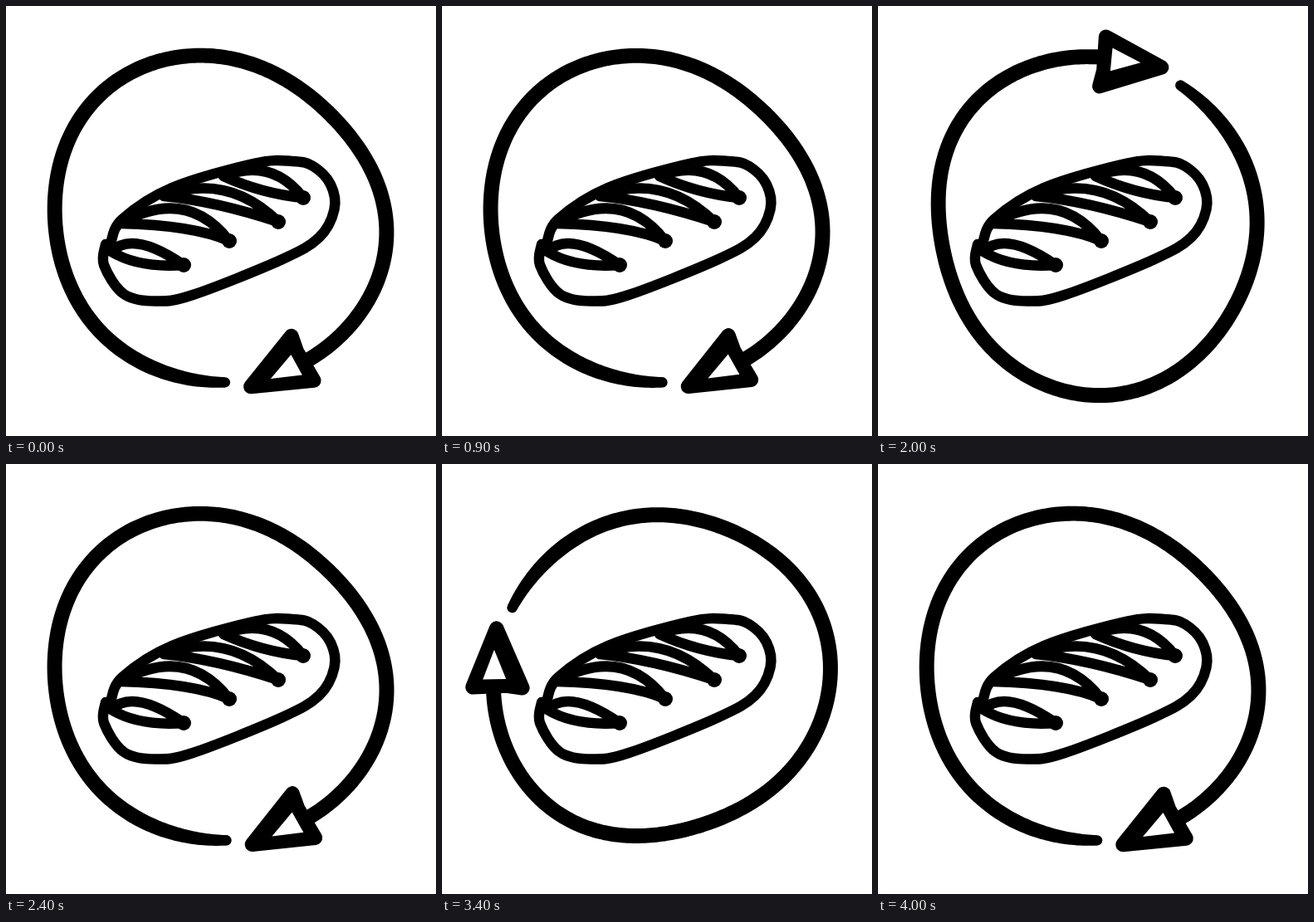
Recreate the animation shown at these times as an HTML page with a canvas. Size 518x518 px, loop 4400 ms.

```html
<!DOCTYPE html>
<html lang="en">
<head>
<meta charset="utf-8">
<title>Bread loop</title>
<style>
  html, body { margin: 0; width: 100%; height: 100%; overflow: hidden; background: #fff; }
  canvas { display: block; width: 518px; height: 518px; }
</style>
</head>
<body>
<canvas id="stage" width="518" height="518"></canvas>
<script>
const ctx = document.getElementById('stage').getContext('2d');
const SIZE = 518, MID = 259, FULL = Math.PI * 2;
const LOOP = 4400, STEP = 100, TURN = 1500, SPIN = 1000, LEAD = 34;

// The ring runs clockwise from its tail to the arrow's neck, in degrees
const TAIL = 88.5, NECK = 418;

const LOAF = [[120, 287], [118, 312], [142, 347], [180, 355.5], [225, 348], [332, 305.5],
  [377, 279], [395.5, 245], [391, 215], [370, 193], [345, 187], [300, 189.5],
  [200, 219], [140, 257], [126, 286]];

// Each cut is a leaf: left tip, right tip, and the control points of its two edges
const CUTS = [
  { left: [127, 296], right: [214, 312], over: [153, 270], under: [160, 316] },
  { left: [138, 262], right: [269, 283], over: [217, 217], under: [226, 264] },
  { left: [190, 229], right: [328, 260], over: [266, 200], under: [252, 235] },
  { left: [262, 205], right: [358, 231], over: [320, 182], under: [308, 226] }
];

const cosDeg = deg => Math.cos(deg * Math.PI / 180);
const sinDeg = deg => Math.sin(deg * Math.PI / 180);
const polar = (deg, r) => [MID + r * cosDeg(deg), MID + r * sinDeg(deg)];
const ease = p => p < 0.5 ? 4 * p ** 3 : 1 - 4 * (1 - p) ** 3;

// A slightly lopsided hand-drawn circle
function radius(deg) {
  return 197.7 - 4.7 * cosDeg(deg - 7) + 7.45 * cosDeg(2 * deg - 77)
    + 3.6 * cosDeg(3 * deg - 18) + 0.7 * cosDeg(5 * deg);
}

// The pen thickens quickly after the tail
function halfWidth(deg) {
  const k = Math.min(1, (deg - TAIL) / 36);
  return 6.2 + 2.8 * k * (2 - k);
}

function poly(pts) {
  ctx.beginPath();
  pts.forEach(p => ctx.lineTo(...p));
  ctx.closePath();
}

function dot([x, y], r) {
  ctx.beginPath();
  ctx.arc(x, y, r, 0, FULL);
  ctx.fill();
}

// Smooth stroke through all points
function curve(pts) {
  const at = i => pts[Math.max(0, Math.min(pts.length - 1, i))];
  ctx.beginPath();
  ctx.moveTo(...pts[0]);
  for (let i = 0; i < pts.length - 1; i++) {
    const [a, b, c, d] = [i - 1, i, i + 1, i + 2].map(at);
    ctx.bezierCurveTo(b[0] + (c[0] - a[0]) / 6, b[1] + (c[1] - a[1]) / 6,
      c[0] - (d[0] - b[0]) / 6, c[1] - (d[1] - b[1]) / 6, ...c);
  }
  ctx.stroke();
}

function drawRing() {
  const outer = [], inner = [];
  for (let a = TAIL; a <= NECK; a++) {
    const r = radius(a), h = halfWidth(a);
    outer.push(polar(a, r + h));
    inner.unshift(polar(a, r - h));
  }
  poly(outer.concat(inner));
  ctx.fill();
  dot(polar(TAIL, radius(TAIL)), halfWidth(TAIL));
}

function drawHead() {
  ctx.lineWidth = 17.5;
  poly([[344, 397.5], [295, 458.5], [371, 451], [350.5, 416]]);
  ctx.fill();
  ctx.stroke();
  ctx.fillStyle = '#fff';
  poly([[343.5, 420], [319, 449], [357, 444.5]]);
  ctx.fill();
  ctx.fillStyle = '#000';
}

function drawBread() {
  ctx.lineWidth = 12.5;
  curve(LOAF);
  for (const { left, right, over, under } of CUTS) {
    ctx.beginPath();
    ctx.moveTo(...left);
    ctx.quadraticCurveTo(...over, ...right);
    ctx.quadraticCurveTo(...under, ...left);
    ctx.stroke();
    dot(right, 9);
  }
}

function draw(ms) {
  const t = Math.floor((ms % LOOP) / STEP) * STEP;
  const p = Math.min(1, (t % TURN + LEAD) / SPIN);
  ctx.fillStyle = '#fff';
  ctx.fillRect(0, 0, SIZE, SIZE);
  ctx.fillStyle = ctx.strokeStyle = '#000';
  ctx.lineCap = ctx.lineJoin = 'round';
  ctx.save();
  ctx.translate(MID, MID);
  ctx.rotate(ease(p) * FULL);
  ctx.translate(-MID, -MID);
  drawRing();
  drawHead();
  ctx.restore();
  drawBread();
}

const start = performance.now();
function tick() {
  draw(performance.now() - start);
  requestAnimationFrame(tick);
}
tick();
</script>
</body>
</html>
```
